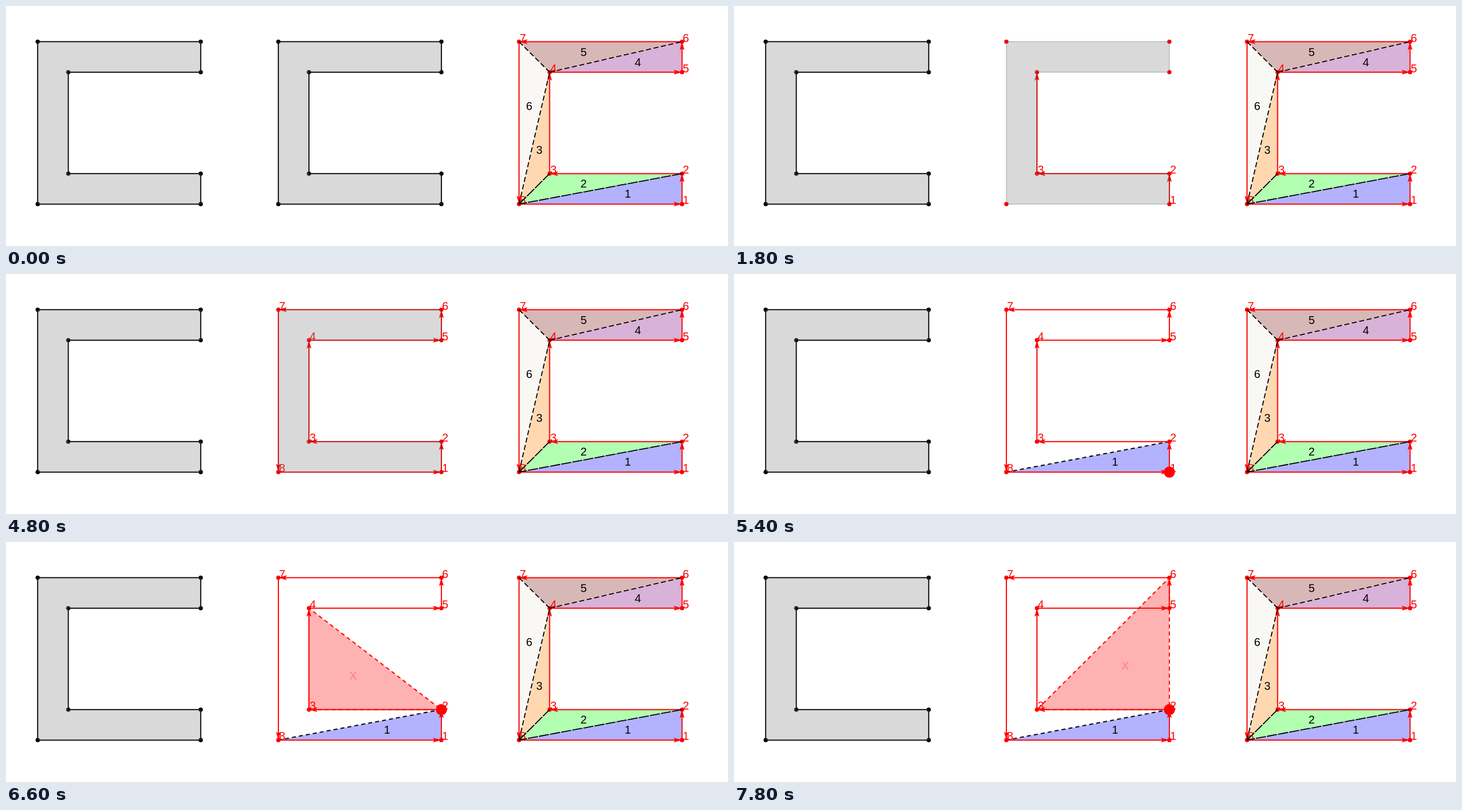
An HTML page with a canvas that plays this animation: 1280x427 px, repeating every 8 s.

```html
<!DOCTYPE html>
<html lang="en">
<head>
<meta charset="utf-8">
<title>Polygon triangulation by ear clipping</title>
<style>
html, body { margin: 0; overflow: hidden; background: #fff; }
canvas { display: block; }
</style>
</head>
<body>
<canvas id="stage" width="1280" height="427"></canvas>
<script>
const ctx = document.getElementById('stage').getContext('2d');
const LOOP = 8000, STEP = 600, PANEL = 426.67, RED = '#f00';
const [x0, x1, x2] = [56.2, 110.4, 345.2];
const [y0, y1, y2, y3] = [63.5, 117.8, 298.2, 352.4];
// Vertices 1 to 8, in drawing order
const shape = [[x2, y3], [x2, y2], [x1, y2], [x1, y1], [x2, y1], [x2, y0], [x0, y0], [x0, y3]];
const ears = [
  [8, 1, 2, '#b2b2ff'], [8, 2, 3, '#b2ffb2'], [8, 3, 4, '#ffd8b2'],
  [4, 5, 6, '#d8b2d8'], [4, 6, 7, '#d8b7b7'], [4, 7, 8, '#faf8f5']
];
const rejected = [[1, 2, 3], [2, 3, 4], [2, 3, 5], [2, 3, 6]];
const at = n => shape[(n - 1) % 8];

function trace(points, closed) {
  ctx.beginPath();
  points.forEach(p => ctx.lineTo(...p));
  if (closed) ctx.closePath();
}

function line(points, color, width = 2, dash = [], closed = false) {
  trace(points, closed);
  ctx.strokeStyle = color;
  ctx.lineWidth = width;
  ctx.setLineDash(dash);
  ctx.stroke();
  ctx.setLineDash([]);
}

function fill(points, color) {
  trace(points, true);
  ctx.fillStyle = color;
  ctx.fill();
}

function dot([x, y], color, r = 3.8) {
  ctx.beginPath();
  ctx.arc(x, y, r, 0, 7);
  ctx.fillStyle = color;
  ctx.fill();
}

function text(s, x, y, color, align) {
  ctx.font = '20px "Liberation Sans", Arial, sans-serif';
  ctx.textAlign = align;
  ctx.fillStyle = color;
  ctx.fillText(s, x, y);
}

function centerText(s, tri, color) {
  const mean = i => tri.reduce((sum, p) => sum + p[i], 0) / 3;
  text(s, mean(0), mean(1) + 7, color, 'center');
}

function arrow(a, b) {
  const angle = Math.atan2(b[1] - a[1], b[0] - a[0]);
  const length = Math.hypot(b[0] - a[0], b[1] - a[1]);
  ctx.save();
  ctx.translate(...b);
  ctx.rotate(angle);
  line([[-length, 0], [-10, 0]], RED);
  fill([[0, 0], [-15, -4.2], [-12, 0], [-15, 4.2]], RED);
  ctx.restore();
}

function arrows(count) {
  for (let n = 1; n <= count; n++) {
    arrow(at(n), at(n + 1));
    text(n, at(n)[0] + 1.2, at(n)[1], RED, 'left');
  }
  shape.forEach(p => dot(p, RED));
}

function overlay() {
  fill(shape, 'rgba(128,128,128,.3)');
  line(shape, 'rgba(0,0,0,.3)', 1, [], true);
}

function outline() {
  line(shape, '#000', 2, [], true);
  shape.forEach(p => dot(p, '#000'));
  overlay();
}

function clipping(step) {
  const [a, b, c, color] = ears[0];
  const ear = [a, b, c].map(at);
  const bad = step > 9 && rejected[step - 10].map(at);
  fill(ear, color);
  line([ear[2], ear[0]], '#000', 2, [7, 5.5]);
  if (bad) {
    fill(bad, 'rgba(255,0,0,.3)');
    line([bad[0], bad[1], bad[2], bad[0]], RED, 2, [7, 5.5]);
    centerText('X', bad, 'rgba(255,0,0,.3)');
  }
  centerText(1, ear, '#000');
  arrows(8);
  dot(at(bad ? 2 : 1), RED, 9.9);
}

function triangulated() {
  ears.forEach(([a, b, c, color]) => fill([a, b, c].map(at), color));
  arrows(8);
  [[2, 8], [8, 3]].forEach(e => line(e.map(at), '#000', 1.8, [18, 2]));
  [[8, 4], [4, 6], [4, 7]].forEach(e => line(e.map(at), '#000', 1.8, [9, 4.5]));
  ears.forEach(([a, b, c], i) => centerText(i + 1, [a, b, c].map(at), '#000'));
}

function panel(i, draw) {
  ctx.save();
  ctx.translate(i * PANEL, 0);
  draw();
  ctx.restore();
}

function frame(now) {
  const step = Math.floor(now % LOOP / STEP);
  ctx.fillStyle = '#fff';
  ctx.fillRect(0, 0, 1280, 427);
  panel(0, outline);
  panel(1, () => {
    if (!step) outline();
    else if (step < 9) { arrows(step); overlay(); }
    else clipping(step);
  });
  panel(2, triangulated);
}

const start = performance.now();
function tick() {
  frame(performance.now() - start);
  requestAnimationFrame(tick);
}
tick();
</script>
</body>
</html>
```
